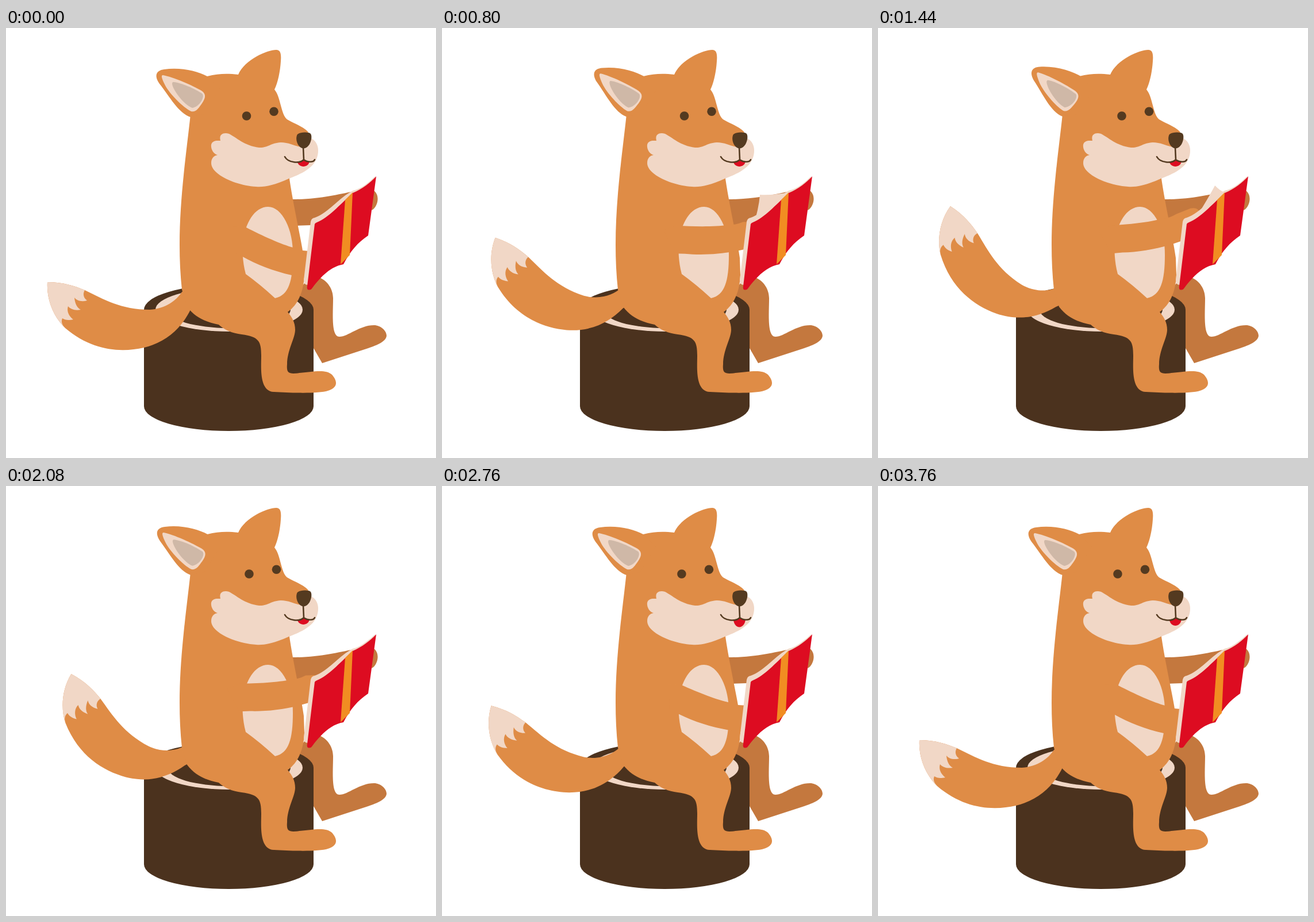
Animation of 748 by 748 pixels, one loop 3.8 s. Source, as an HTML page:

```html
<!DOCTYPE html>
<html>
<head>
<meta charset="utf-8">
<title>Reading fox</title>
<style>
  html, body { margin: 0; height: 100%; overflow: hidden; background: #fff; }
  svg { display: block; width: 100vw; height: 100vh; }
  .fur { fill: #df8c46; }
  .shade { fill: #c4783e; }
  .cream { fill: #f1d7c6; }
  .wood { fill: #4b321e; }
  .dark { fill: #543a20; }
  .red { fill: #dd0c21; }
  .line { fill: none; stroke: #543a20; stroke-width: 2.6; stroke-linecap: round; }
</style>
</head>
<body>
<svg viewBox="0 0 748 748">
  <!-- far limbs -->
  <path class="shade" d="M545 434C560 440 569 455 569 470C569 495 565 537 580 537C595 537 615 517 640 517C652 517 662 527 662 535C662 545 645 552 630 557L550 583L535 557L500 470L519 444Z"/>
  <path class="shade" d="M490 298C540 299 575 290 605 284L640 283C650 290 648 308 638 316L600 330L530 343L500 344Z"/>
  <!-- log -->
  <path class="wood" d="M240 490A147.5 44 0 0 1 535 490V658A147.5 43 0 0 1 240 658Z"/>
  <ellipse class="cream" cx="388" cy="490" rx="128" ry="38"/>
  <ellipse class="wood" cx="388" cy="490" rx="107" ry="32"/>
  <g id="tail">
    <path class="fur" d="M72 442C100 442 120 449 137 456C170 472 200 490 250 490C282 488 299 470 306 459L330 450L335 470L321 490C305 522 280 546 240 556C200 565 150 562 103 522C85 505 70 475 72 442Z"/>
    <path class="cream" d="M72 442C100 442 120 449 137 456C133 463 135 470 141 474C131 477 123 474 119 469C120 480 124 487 130 490C120 492 112 489 108 484C105 493 110 502 117 507C108 509 103 508 98 505C95 512 99 518 103 522C85 505 70 475 72 442Z"/>
  </g>
  <!-- body, head and right ear -->
  <path class="fur" d="M321 150C312 235 294 345 306 455L315 485C330 505 350 512 370 516Q385 530 410 533C440 537 444 545 444 570C444 590 440 632 466 633C500 635 545 636 560 631C580 625 575 612 567 603C555 592 530 599 500 601C490 601 488 597 489 585C489 560 503 540 503 525C503 510 495 500 490 494C510 480 518 455 519 430L518 400C514 370 500 310 493 262L530 200L525 180C515 170 500 166 489 159C478 150 478 120 467 107C473 95 477 75 478 58C479 46 478 38 470 38C455 38 415 55 404 81C385 79 370 79 350 84Z"/>
  <g id="ear">
    <path class="fur" d="M321 155C300 148 285 120 267 97C258 84 260 74 275 72C305 68 332 75 350 84L372 105L345 150Z"/>
    <path class="cream" d="M273 82C290 85 325 100 340 109C349 115 347 122 341 131C335 139 331 147 322 145C308 138 285 115 277 100C271 88 269 82 273 82Z"/>
    <path fill="#cfb8a7" d="M291 94C305 95 329 106 341 114C347 119 337 137 324 139C310 134 290 108 289 97Q289 94 291 94Z"/>
  </g>
  <!-- face -->
  <path class="cream" d="M373 196C370 185 378 181 388 184C400 190 415 205 440 208C455 209 460 200 478 199C495 199 505 208 518 207L531 192C539 196 543 204 543 213C543 238 522 251 492 262C465 274 450 277 435 276C400 274 357 255 357 235C357 226 362 222 368 221C358 218 354 204 359 199C363 195 369 196 373 196Z"/>
  <g id="eyes" class="dark">
    <circle cx="418.5" cy="153" r="7.8"/>
    <circle cx="466" cy="145.3" r="7.8"/>
  </g>
  <path id="tongue" class="red"/>
  <path class="dark" d="M506 187C507 181 526 180 530 184C534 190 529 209 518 209.500C508 209 503 195 506 187Z"/>
  <path class="line" d="M517 207L518 229M485 224C491 235 511 236 518 229C524 234 535 234 537 229"/>
  <!-- belly and near arm -->
  <path class="cream" d="M456 311C480 311 500 350 499 395C499 440 492 465 468 470Q442 446 417 428C411 405 411 385 412 372C416 340 432 311 456 311Z"/>
  <path id="arm" class="fur"/>
  <!-- book -->
  <path id="page" class="cream"/>
  <path class="cream" d="M530 337Q531 331 537 330C560 322 580 295 603 283C618 280 632 268 642 258L640 270L600 300L540 345L526 447Q517 447 518 438Z"/>
  <path class="red" d="M537 341Q538 339 541 338C562 329 578 310 603 287C620 280 635 268 644 258L630 361C612 373 599 388 587 411C565 415 549 431 533 452Q530 457 525 455Q523 453 524 449Z"/>
  <path fill="#f18d22" d="M590 299L603 286L598 395L582 411Z"/>
</svg>
<script>
const LOOP = 3800;
const part = id => document.getElementById(id);
const set = (id, name, value) => part(id).setAttribute(name, value);
const linear = u => u;
const smooth = u => (1 - Math.cos(Math.PI * u)) / 2;

// Value at time t between [time, value] keys.
function tween(t, keys, ease = smooth) {
  const next = keys.findIndex(k => k[0] > t);
  if (next === 0) return keys[0][1];
  if (next < 0) return keys[keys.length - 1][1];
  const [t0, a] = keys[next - 1], [t1, b] = keys[next];
  return a + (b - a) * ease((t - t0) / (t1 - t0));
}

function draw(t) {
  const tail = tween(t, [[0, 0], [1500, 32.8], [3800, 0]]);
  set('tail', 'transform', `rotate(${tail} 324 468)`);

  const ear = tween(t, [[0, 0], [1480, 4.7], [1700, 8], [2080, 1], [2240, 0]], linear);
  set('ear', 'transform', `rotate(${ear} 335 149)`);

  const gaze = tween(t, [[0, 0], [1440, 5.5], [2060, 5], [2360, -2.8], [3120, -0.5], [3800, -1.6]], linear);
  set('eyes', 'transform', `translate(${gaze})`);

  const lick = 243.7 + tween(t, [[2100, 0], [2900, 6.5], [3160, 6.5], [3800, 2.8]]);
  set('tongue', 'd', `M507 233C509 ${lick} 526 ${lick} 528 232L518 230Z`);

  const lift = tween(t, [[0, 0], [1160, -30.5], [1850, -30.5], [3000, 0]]);
  const reach = 18 * tween(t, [[800, 0], [1440, 1], [1900, 0]]);
  set('arm', 'd', `M395 345L418 347C445 361 480 377 500 382Q512 388 527 388L${535 + reach} 392Q${549 + reach} 396 ${545 + reach} 412L530 437L497 430C465 423 435 411 412 398L395 390Z`);
  set('arm', 'transform', `rotate(${lift} 405 370)`);

  // The free corner of the turning page; the cover hides its lower part.
  const x = tween(t, [[350, 538], [800, 553], [1440, 586], [1960, 643]], linear);
  const y = tween(t, [[350, 333], [800, 290], [1440, 274], [1960, 258]], linear);
  set('page', 'd', `M603 286Q${(x + 603) / 2} ${(y + 286) / 2 + 3} ${x} ${y}Q${x * .55 + 247} ${y * .55 + 155} 540 350L600 320Z`);
}

function frame(now) {
  draw(now % LOOP);
  requestAnimationFrame(frame);
}
draw(0);
requestAnimationFrame(frame);
</script>
</body>
</html>
```
